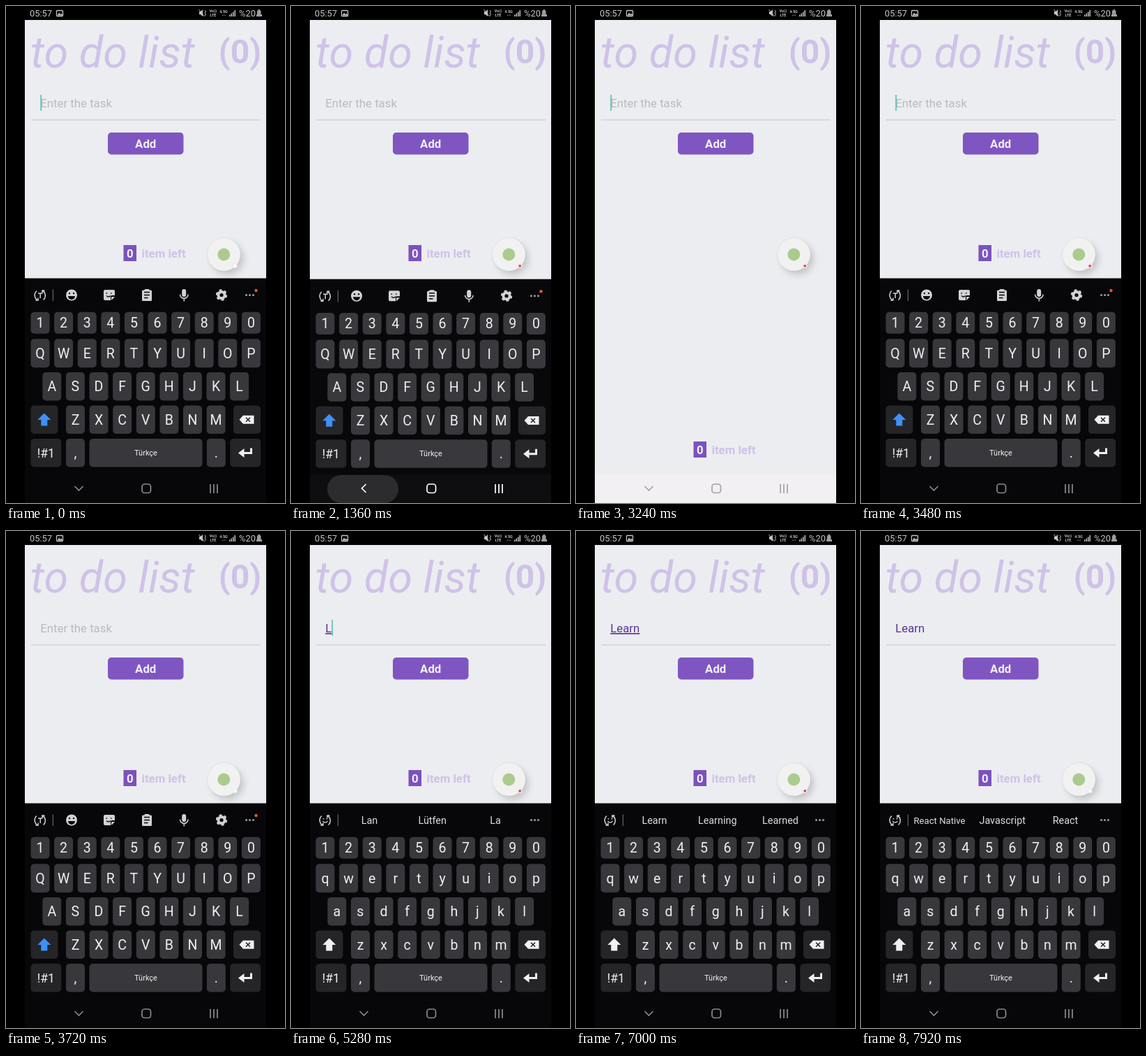
An HTML page that plays this animation: 400 by 711 pixels, repeating every 8 s.

```html
<!DOCTYPE html>
<html lang="en">
<head>
<meta charset="utf-8">
<title>To do list</title>
<style>
  html, body { margin: 0; width: 100%; height: 100%; overflow: hidden; background: #000; }
  svg { display: block; width: 100%; height: 100%; font-family: Roboto, sans-serif; }
  text { white-space: pre; }
  .mid { text-anchor: middle; }
  .bold { font-weight: 700; }
  .lilac { fill: #cfc2e8; }
  .field { font-size: 16.8px; }
  .label { font-size: 19.5px; fill: #f0f0f0; text-anchor: middle; }
  .icon { fill: #d2d2d3; }
  .line { fill: none; stroke: #d2d2d3; stroke-width: 1.5; }
  #bubble { filter: drop-shadow(5px 6px 5px rgba(0, 0, 0, .15)) drop-shadow(0 0 1px rgba(0, 0, 0, .1)); }
</style>
</head>
<body>
<svg id="stage" viewBox="0 0 400 711" preserveAspectRatio="none">
  <defs><clipPath id="phone"><rect x="27" y="0" width="346" height="711"/></clipPath></defs>
  <rect width="400" height="711"/>
  <g clip-path="url(#phone)">
    <rect x="27" y="20" width="346" height="691" fill="#ecedf0"/>

    <g id="status" fill="#c4c4c4">
      <text x="34" y="15" font-size="12.9">05:57</text>
      <rect x="72.5" y="6.500" width="9" height="8" rx="1" fill="none" stroke="#c4c4c4" stroke-width="1.300"/>
      <path d="M73.500 13.500l2.500-4 2 2.500 1.500-1.500 2 3z"/>
      <path d="M277 8h2l3-3v10l-3-3h-2z"/>
      <path d="M276.500 5l8 10M285 6l1.500 2-1.500 2 1.500 2-1.500 2" fill="none" stroke="#c4c4c4"/>
      <text class="mid bold" x="297" y="9" font-size="5.500">Vo))</text>
      <text class="mid bold" x="297" y="15" font-size="5.500">LTE</text>
      <text class="mid bold" x="312" y="9.500" font-size="5.500">4.5G</text>
      <path d="M309.500 14l1.500-2 1.500 2zM312.500 12.500l1.500 2 1.500-2z" opacity=".5"/>
      <path d="M320 12.500h1.500V15H320zM322.500 10.500h1.500V15h-1.500zM325 8.500h1.500V15H325zM327.500 6h1.500v9h-1.500z"/>
      <text x="334" y="15" font-size="12.900">%20</text>
      <path d="M361.500 5h2.500v1.500h1.500V12H367v3h-8v-3h1V6.500h1.500z" opacity=".8"/>
    </g>

    <text class="lilac" x="35" y="88" font-size="63" font-style="italic">to do list</text>
    <text class="lilac mid bold" x="335.500" y="81.500" font-size="48">(0)</text>
    <text id="entry" class="field" x="49.300" y="145"></text>
    <rect id="caret" y="127" width="1.800" height="23" fill="#67c1b8"/>
    <rect x="36" y="162.500" width="329" height="1" fill="#c8c0e2"/>
    <rect x="146" y="181" width="108.500" height="31.500" rx="5" fill="#7f56c1"/>
    <text class="field mid bold" x="200.200" y="203" fill="#f1eef6">Add</text>
    <rect id="navLight" x="27" y="670" width="346" height="41" fill="#f2f0f3"/>

    <g id="item">
      <rect x="168.500" y="342" width="18.500" height="23" fill="#7b51be"/>
      <text class="field mid bold" x="177.700" y="360" fill="#f4f1f8">0</text>
      <text class="field lilac bold" x="194.500" y="360">item left</text>
    </g>

    <g id="keyboard">
      <rect x="27" y="389.500" width="346" height="400" fill="#070609"/>
      <g id="refresh" class="line">
        <path d="M44 407.500a8.300 8.300 0 0 0 1.500 13.500M53.500 420.500a8.300 8.300 0 0 0-1.500-13.500M42.500 421h3.500v-3.500M55.500 407h-3.500v3.500"/>
        <path id="glyphT" d="M46 411h6.500M49.200 411v7"/>
        <path id="glyphSmile" d="M46.500 411v1.500M51.500 411v1.500M45.500 415a4 4 0 0 0 7 0"/>
        <path d="M67.300 405.500v16.500" stroke="#77777a" stroke-width="1"/>
      </g>
      <g id="tools" class="icon">
        <circle cx="94" cy="413.500" r="8"/>
        <path d="M89 415h10a5 5 0 0 1-10 0z" fill="#070609"/>
        <circle cx="91" cy="411" r="1.200" fill="#070609"/><circle cx="97" cy="411" r="1.200" fill="#070609"/>
        <path d="M142 406h12q2 0 2 2v6h-4q-2 0-2 2v5h-8q-2 0-2-2v-11q0-2 2-2zM152 416h4l-5 5v-4z"/>
        <path d="M143.500 411h1.500M150 411h1.500M144 414.500q3 3 6 0" fill="none" stroke="#070609" stroke-width="1.300"/>
        <rect x="195" y="406.500" width="14" height="15.500" rx="1.500"/><rect x="198.500" y="405" width="7" height="4" rx="1"/>
        <path d="M198 409.500h8M198 413.500h8M198 417.500h5.500" stroke="#070609" stroke-width="1.300"/>
        <rect x="252.200" y="405" width="6" height="11" rx="3"/>
        <path class="line" d="M249.500 412.500a5.800 5.800 0 0 0 11.600 0M255.300 418.500v4"/>
        <circle cx="309" cy="413.500" r="4.600" fill="none" stroke="#d2d2d3" stroke-width="4"/>
        <circle cx="309" cy="413.500" r="7" fill="none" stroke="#d2d2d3" stroke-width="2.400" stroke-dasharray="3.900 3.430"/>
        <circle cx="358.500" cy="407" r="2.200" fill="#e8562f"/>
      </g>
      <g fill="#98989b"><circle cx="344.500" cy="413.500" r="1.600"/><circle cx="349.500" cy="413.500" r="1.600"/><circle cx="354.500" cy="413.500" r="1.600"/></g>
      <g id="hints" class="mid" fill="#dededf"></g>
      <g id="keys"></g>
      <path id="shift" d="M54.800 582.500l9.500 9.500h-5v8.500h-9v-8.500h-5z"/>
      <path d="M334.500 591.800l5.500-6h15.500v12H340z" fill="#f0f0f0"/>
      <path d="M344 588.800l6 6M350 588.800l-6 6" stroke="#252527" stroke-width="1.600"/>
      <path d="M351.500 632.500v7H340" fill="none" stroke="#f0f0f0" stroke-width="3"/>
      <path d="M333 639.500l8.500-6.500v13z" fill="#f0f0f0"/>
      <g id="popup">
        <rect x="-23.700" y="-29" width="47.400" height="58" rx="10" fill="#222224"/>
        <text id="popChar" class="mid" y="12.500" font-size="34" fill="#fff"></text>
      </g>
    </g>

    <rect id="navDark" x="27" y="670.500" width="346" height="41" fill="#0e0e10"/>
    <rect id="ripple" x="52" y="671" width="102" height="40" rx="20" fill="#2c2c2e"/>
    <g id="nav" fill="none" stroke-width="1.700">
      <path id="back" d="M-6-3l6 6 6-6"/>
      <rect x="195" y="684" width="12.500" height="12.500" rx="3.500"/>
      <path d="M293 684v13M298 684v13M303 684v13"/>
    </g>

    <g id="bubble">
      <circle cx="312.500" cy="355.500" r="23.500" fill="#f1f1f2"/>
    </g>
    <circle cx="312.300" cy="355.500" r="9" fill="#abcb8e"/>
    <circle cx="328.200" cy="371.800" r="3.200" fill="#fafafa" stroke="#d8d5d5" stroke-width=".5"/>
    <circle id="record" cx="328.200" cy="371.800" r="1.900" fill="#d8434b"/>
  </g>
</svg>
<script>
const LOOP = 8000, BLINK = 500, POPUP_MS = 140;
const $ = id => document.getElementById(id);

// time, key, text after the press, suggestions
const presses = [
  [4880, 'L', 'L', ['Lan', 'Lütfen', 'La']],
  [5360, 'e', 'Le', ['Le', 'Les', 'Lezzet']],
  [5760, 'a', 'Lea', ['Learn', 'Leaf', 'Lea']],
  [6080, 'r', 'Lear', ['Learn', 'Leaf', 'Leş']],
  [6500, 'n', 'Learn', ['Learn', 'Learning', 'Learned']],
  [7040, ' ', 'Learn ', ['Learn', 'Learning', 'Learned']],
];
const nextWords = { at: 7320, words: ['React Native', 'Javascript', 'React'] };
const caretResets = [-180, 3140, ...presses.map(p => p[0])];

// time, value
const slide = [[1340, 0], [1360, 1], [1400, 10], [1480, 46], [1560, 80], [3260, 46], [3420, 0]];
const fade = [[1360, 1], [1400, .75], [1480, .17], [1540, 0], [3270, 0], [3420, 1]];
const ripple = [[1160, 0], [1300, 1], [1380, 1], [1480, .05], [1560, 0]];
const record = [[0, 0], [440, 1], [1560, 1], [1940, 0], [2760, 0], [3100, 1], [3560, 1],
  [3680, 0], [3800, 0], [4160, 1], [7400, 1], [7800, 0]];

function track(steps, t) {
  const i = steps.findIndex(s => s[0] > t);
  if (i === 0) return steps[0][1];
  if (i < 0) return steps[steps.length - 1][1];
  const [t0, a] = steps[i - 1], [t1, b] = steps[i];
  return a + (b - a) * (t - t0) / (t1 - t0);
}

function add(parent, tag, attrs, content = '') {
  const el = document.createElementNS('http://www.w3.org/2000/svg', tag);
  for (const name in attrs) el.setAttribute(name, attrs[name]);
  el.textContent = content;
  return parent.appendChild(el);
}

const show = (id, on) => $(id).setAttribute('visibility', on ? 'inherit' : 'hidden');
const set = (id, name, value) => $(id).setAttribute(name, value);

const keys = {};
function addKey(name, x, y, w, h, special) {
  const rect = add($('keys'), 'rect', { x, y, width: w, height: h, rx: 5, fill: special ? '#252527' : '#38373b' });
  const cx = x + w / 2, cy = y + h / 2;
  const label = add($('keys'), 'text', { class: 'label', x: cx, y: cy + 7 }, name);
  keys[name.toLowerCase()] = { rect, label, cx, cy };
  return label;
}

const PITCH = 33.6, KEY_W = 27;
[['1234567890', 35.5, 437.7, 31], ['QWERTYUIOP', 35.5, 476.3, 41],
 ['ASDFGHJKL', 52.3, 524, 40.5], ['ZXCVBNM', 86, 571.5, 40.5]].forEach(([row, x, y, h]) =>
  [...row].forEach((c, i) => addKey(c, x + i * PITCH, y, KEY_W, h)));
addKey('', 35.5, 571.5, 39, 40.5, true);
addKey('', 326, 571.5, 39, 40.5, true);
addKey('!#1', 35.5, 619, 43.8, 40.5, true).style.fontSize = '17.5px';
addKey(',', 86, 619, KEY_W, 40.5);
addKey(' ', 119.5, 619, 162, 40.5);
addKey('.', 287.8, 619, KEY_W, 40.5);
addKey('', 321.3, 619, 43.8, 40.5, true);
const space = keys[' '];
space.label.textContent = 'Türkçe';
space.label.style.fontSize = '11px';
space.label.setAttribute('y', space.cy + 4);

const letters = [...'qwertyuiopasdfghjklzxcvbnm'];
const hints = [112.5, 202.7, 293].map(x => add($('hints'), 'text', { x, y: 419 }));

function drawTyping(t) {
  const press = presses.filter(p => p[0] <= t).pop();
  const typed = press ? press[2] : '';
  const entry = $('entry');
  entry.textContent = typed || 'Enter the task';
  entry.setAttribute('fill', typed ? '#5a3299' : '#bababd');
  entry.setAttribute('text-decoration', typed && !typed.endsWith(' ') ? 'underline' : 'none');

  const reset = caretResets.filter(r => r <= t).pop();
  show('caret', Math.floor((t - reset) / BLINK) % 2 === 0);
  set('caret', 'x', 49.3 + (typed ? entry.getComputedTextLength() : 0));

  letters.forEach(c => { keys[c].label.textContent = press ? c : c.toUpperCase(); });
  set('shift', 'fill', press ? '#f0f0f0' : '#3f90f7');
  show('tools', !press);
  show('hints', press);
  show('glyphT', !press);
  show('glyphSmile', press);
  const words = t >= nextWords.at ? nextWords.words : press ? press[3] : [];
  hints.forEach((el, i) => {
    const word = words[i] || '';
    el.textContent = word;
    el.setAttribute('font-size', word.length > 10 ? 13.2 : 14.4);
  });

  const down = press && t - press[0] < POPUP_MS;
  const isSpace = press && press[1] === ' ';
  space.rect.setAttribute('fill', down && isSpace ? '#58575b' : '#38373b');
  show('popup', down && !isSpace);
  if (down && !isSpace) {
    const { cx, cy } = keys[press[1].toLowerCase()];
    set('popup', 'transform', `translate(${cx} ${cy - 59.5})`);
    $('popChar').textContent = press[1];
  }
}

function drawNav(t) {
  const closing = t >= 1340 && t < 1400;
  const light = t >= 1400 && t < 3330;
  const down = t < 1340 || t >= 3180;
  const colour = closing ? '#fff' : !light ? '#8a8a8c' : down ? '#a5a3a6' : '#505053';
  set('nav', 'stroke', colour);
  set('back', 'transform', `translate(104.500 690)${down ? '' : ' rotate(90)'}`);
  show('navDark', closing);
  const r = track(ripple, t);
  set('ripple', 'opacity', r);
  const grow = Math.min(1, Math.max(0, (t - 1160) / 160));
  set('ripple', 'x', 103 - 51 * grow);
  set('ripple', 'width', 102 * grow);
}

function render(t) {
  const open = t < 1400 || t >= 3360;
  set('item', 'transform', `translate(0 ${open ? 0 : 281})`);
  set('keyboard', 'transform', `translate(0 ${track(slide, t)})`);
  set('keyboard', 'opacity', track(fade, t));
  set('record', 'opacity', track(record, t));
  drawTyping(t);
  drawNav(t);
}

const start = performance.now();
function tick() {
  render((performance.now() - start) % LOOP);
  requestAnimationFrame(tick);
}
tick();
</script>
</body>
</html>
```
